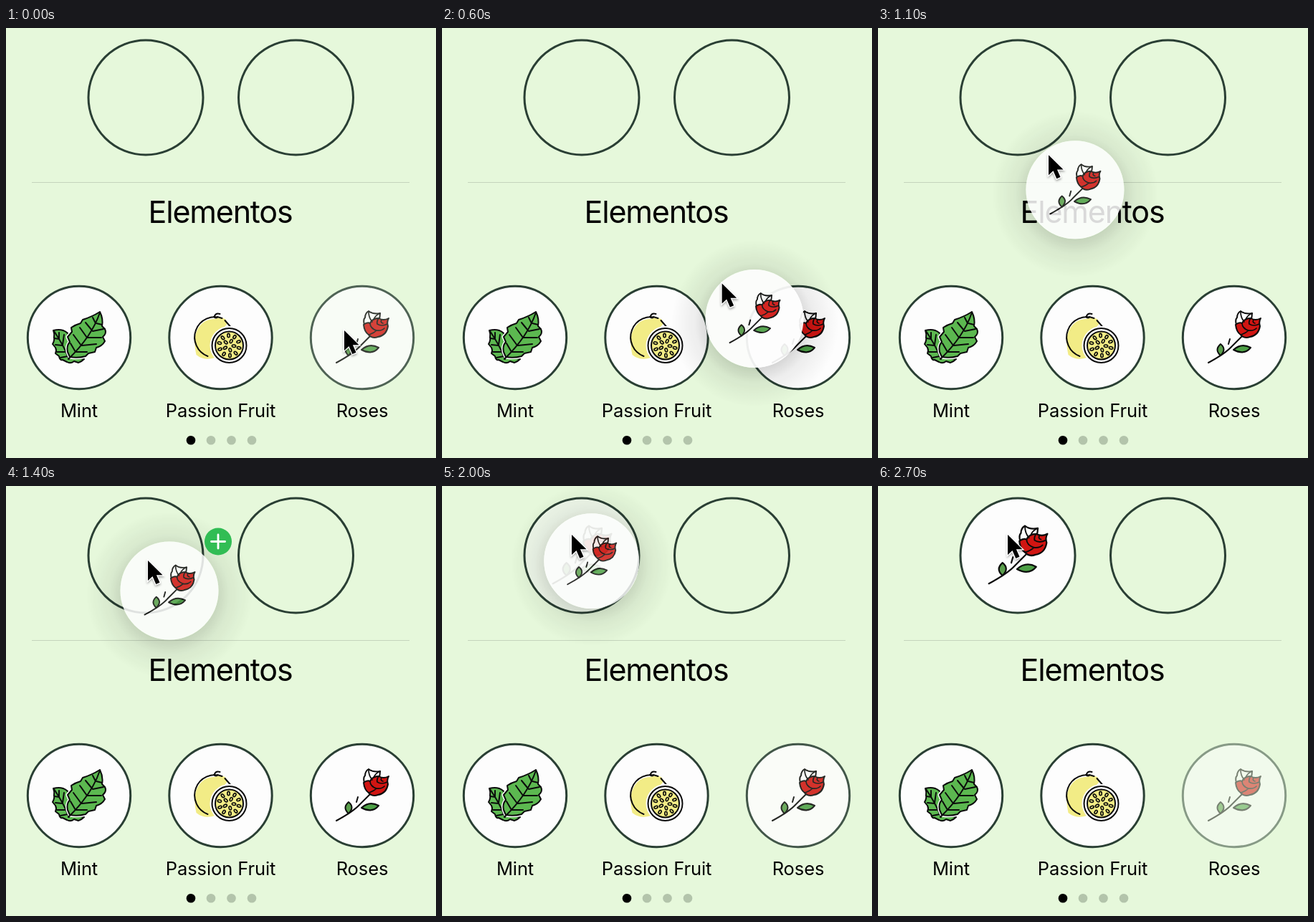
An HTML page for the animation above (2.8 s loop, 600 by 600 pixels).

```html
<!DOCTYPE html>
<html lang="es">
<head>
<meta charset="utf-8">
<title>Elementos</title>
<style>
  html, body { margin: 0; width: 100%; height: 100%; overflow: hidden; background: #e6f8db; }
  svg { display: block; width: 100%; height: 100%; }
  text { font-family: Inter, sans-serif; font-optical-sizing: none; text-anchor: middle; }
  .label { font-size: 25.5px; letter-spacing: -.1px; }
  .ink { fill: none; stroke: #0b0b0b; stroke-width: 2; stroke-linecap: round; stroke-linejoin: round; }
  .ring { stroke: #2a3f34; stroke-width: 3; fill: none; }
  .plate { fill: #fdfdfd; }
</style>
</head>
<body>
<svg viewBox="0 0 600 600">
  <defs>
    <radialGradient id="shade" gradientUnits="userSpaceOnUse" cx="0" cy="6" r="118">
      <stop offset=".53" stop-opacity=".17"/>
      <stop offset=".7" stop-opacity=".07"/>
      <stop offset="1" stop-opacity="0"/>
    </radialGradient>
    <filter id="soft" x="-50%" y="-50%" width="200%" height="200%">
      <feDropShadow dx="0" dy="2" stdDeviation="1.5" flood-opacity=".35"/>
    </filter>

    <g id="mint" class="ink">
      <path fill="#5cb850" d="M-36-10Q-24-13-17-7L-8 2L-4 28L7 30Q3 34-1 35L-7 33Q-12 37-17 34L-23 31Q-27 32-28 26L-33 22Q-31 18-33 14L-37 9Q-34 4-35 0Q-34-5-36-10Z"/>
      <path d="M-35-9Q-22 10-14 30M-28 2V-7M-23 10L-21-4M-28 2L-34 1M-23 11L-33 10M-19 20L-31 20M-16 26L-26 28"/>
      <path fill="#5cb850" stroke="#fdfdfd" stroke-width="5" d="M29-36Q18-29 5-25L2-20Q-5-18-11-14L-10-8L-16-1L-13 6Q-18 12-16 20L-13 27Q-2 29 9 26L13 22L22 20L24 14Q32 12 36 5L33-1Q39-6 36-12L32-16Q34-26 29-36Z"/>
      <path fill="#5cb850" d="M29-36Q18-29 5-25L2-20Q-5-18-11-14L-10-8L-16-1L-13 6Q-18 12-16 20L-13 27Q-2 29 9 26L13 22L22 20L24 14Q32 12 36 5L33-1Q39-6 36-12L32-16Q34-26 29-36Z"/>
      <path d="M29-35Q18-2-15 30M23-20L19-28M18-10L9-21M11 0L1-14M3 11L-8-4M-5 20L-12 8M24-20L32-18M19-9L34-12M12 0L31 0M4 11L24 9M-5 20L11 20"/>
    </g>

    <g id="fruit" class="ink">
      <path fill="#f2ec86" stroke="none" d="M-9-26Q9-31 9-19Q-12 4-8 28Q-23 33-34 24Q-39 0-32-12Q-24-26-9-26Z"/>
      <path d="M-18 26A28 28 0 1 1 2-27M6-24L13-16M16-13L18-9M-9-29Q-7-35-1-33M-10-29Q-6-26-4-29" />
      <circle class="plate" cx="12" cy="11" r="27" stroke="none"/>
      <circle cx="12" cy="11" r="24"/>
      <circle cx="12" cy="11" r="19.5" fill="#f2ec86"/>
      <g id="seeds" stroke-width="1.6"></g>
    </g>

    <g id="rose" class="ink">
      <path d="M11-2Q5 4-3 12Q-12 22-36 35M-8 9L-6 2"/>
      <path fill="#5a9e4c" d="M-19 25Q-28 17-19 9Q-10 16-19 25Z"/>
      <path fill="#4da046" d="M-1 17Q10 7 23 14Q14 25-1 17Z"/>
      <path class="plate" d="M3-18Q1-25 4-28Q4-34 9-37Q15-32 25-34Q25-28 23-24L14-18Z"/>
      <path fill="#d11512" d="M2-18Q7-22 11-20Q14-27 23-27Q30-23 37-27Q34-22 36-16Q34-3 22-1Q14 2 9-4Q3-8 2-18Z"/>
      <path d="M9-36Q9-28 14-22M25-34Q18-31 16-25M11-20Q11-13 20-10Q27-9 31-13M23-27Q20-23 21-19Q27-15 35-19M9-4Q16-6 20-10M27-25Q25-21 29-20" stroke-width="1.7"/>
    </g>
  </defs>

  <path d="M36 215.5H563" stroke="#c4d4bc"/>
  <text x="299" y="272" font-size="43" letter-spacing="-1.2">Elementos</text>

  <g transform="translate(195 97)">
    <g id="filled">
      <circle class="plate" r="80"/>
      <use href="#rose" transform="scale(1.12)"/>
    </g>
    <circle class="ring" r="80"/>
  </g>
  <circle class="ring" cx="404.5" cy="97" r="80"/>

  <g transform="translate(102 432)">
    <circle class="ring plate" style="fill:#fdfdfd" r="71.7"/><use href="#mint"/>
  </g>
  <g transform="translate(299.5 432)">
    <circle class="ring plate" style="fill:#fdfdfd" r="71.7"/><use href="#fruit"/>
  </g>
  <g id="roses" transform="translate(497 432)">
    <circle class="ring plate" style="fill:#fdfdfd" r="71.7"/><use href="#rose"/>
  </g>

  <g class="label">
    <text x="102" y="543">Mint</text>
    <text x="299.5" y="543">Passion Fruit</text>
    <text x="497" y="543">Roses</text>
  </g>

  <g fill="#b3c4ab">
    <circle cx="258" cy="575.3" r="6.3" fill="#000"/>
    <circle cx="286" cy="575.3" r="6.3"/>
    <circle cx="314.5" cy="575.3" r="6.3"/>
    <circle cx="343" cy="575.3" r="6.3"/>
  </g>

  <g id="disc">
    <circle r="95" fill="none" stroke="url(#shade)" stroke-width="53"/>
    <circle class="plate" r="68.5"/>
    <use href="#rose" transform="scale(.96)"/>
  </g>
  <g id="badge">
    <circle r="20" fill="#31bd54"/>
    <path d="M-10 0H10M0-10V10" stroke="#fff" stroke-width="3" stroke-linecap="round"/>
  </g>
  <g id="cursor" filter="url(#soft)">
    <path d="M1 1V29L7.5 23L12.3 34L17.5 31.8L12.9 21.2H21.5Z" stroke="#fff" stroke-width="2.4" paint-order="stroke"/>
  </g>
</svg>
<script>
const LOOP = 2800, STEP = 100;
const el = id => document.getElementById(id);

// Rings of seeds in the cut half of the fruit.
for (const [count, radius] of [[5, 6.5], [10, 14]])
  for (let i = 0; i < count; i++)
    el('seeds').innerHTML += `<ellipse rx="2.7" ry="1.7" transform="translate(12 11) rotate(${i * 360 / count + radius}) translate(${radius})"/>`;

// Rows are [time, ...values].
const cursorKeys = [[0, 471, 421], [400, 458, 412], [800, 303, 272], [1400, 197, 103],
  [1700, 184, 69], [2000, 180, 67], [2800, 180, 67]];
const discKeys = [[200, 497, 432], [400, 497, 455], [800, 349, 325], [1400, 228, 146],
  [1700, 213, 107], [1950, 209, 105], [2200, 208, 103], [2500, 198, 98]];
const scaleKeys = [[200, 1], [1900, 1], [2200, .83], [2500, .6]];
const discAlpha = [[200, 0], [300, 1], [400, 1], [800, .86], [1900, .86], [2200, .65], [2450, 0]];
const rosesAlpha = [[0, .8], [300, 1], [1900, 1], [2200, .5]];
const filledAlpha = [[1900, 0], [2100, 1]];
const badgeScale = [[1200, 0], [1300, .8], [1400, .95], [1500, 1], [1900, 1], [2000, 0]];

// Monotone cubic through the keys, one curve per column.
function curve(keys, t, col = 1) {
  const last = keys.length - 1;
  if (t <= keys[0][0]) return keys[0][col];
  if (t >= keys[last][0]) return keys[last][col];
  const i = keys.findIndex(k => k[0] > t) - 1;
  const slope = j => j < 0 || j >= last ? 0
    : (keys[j + 1][col] - keys[j][col]) / (keys[j + 1][0] - keys[j][0]);
  const tangent = j => {
    const a = slope(j - 1), b = slope(j);
    return a * b > 0 ? 2 * a * b / (a + b) : 0;
  };
  const span = keys[i + 1][0] - keys[i][0], u = (t - keys[i][0]) / span, v = 1 - u;
  return keys[i][col] * v * v * (1 + 2 * u) + keys[i + 1][col] * u * u * (3 - 2 * u)
    + span * u * v * (tangent(i) * v - tangent(i + 1) * u);
}

const place = (id, x, y, scale = 1) =>
  el(id).setAttribute('transform', `translate(${x} ${y}) scale(${scale})`);
const fade = (id, alpha) => el(id).setAttribute('opacity', alpha);

function draw(now) {
  const t = Math.floor(now % LOOP / STEP) * STEP;
  const x = curve(discKeys, t), y = curve(discKeys, t, 2);
  place('cursor', curve(cursorKeys, t), curve(cursorKeys, t, 2));
  place('disc', x, y, curve(scaleKeys, t));
  place('badge', x + 68, y - 68.5, curve(badgeScale, t));
  fade('disc', curve(discAlpha, t));
  fade('roses', curve(rosesAlpha, t));
  fade('filled', curve(filledAlpha, t));
}

let start;
function tick(now) {
  start ??= now;
  draw(now - start);
  requestAnimationFrame(tick);
}
draw(0);
requestAnimationFrame(tick);
</script>
</body>
</html>
```
